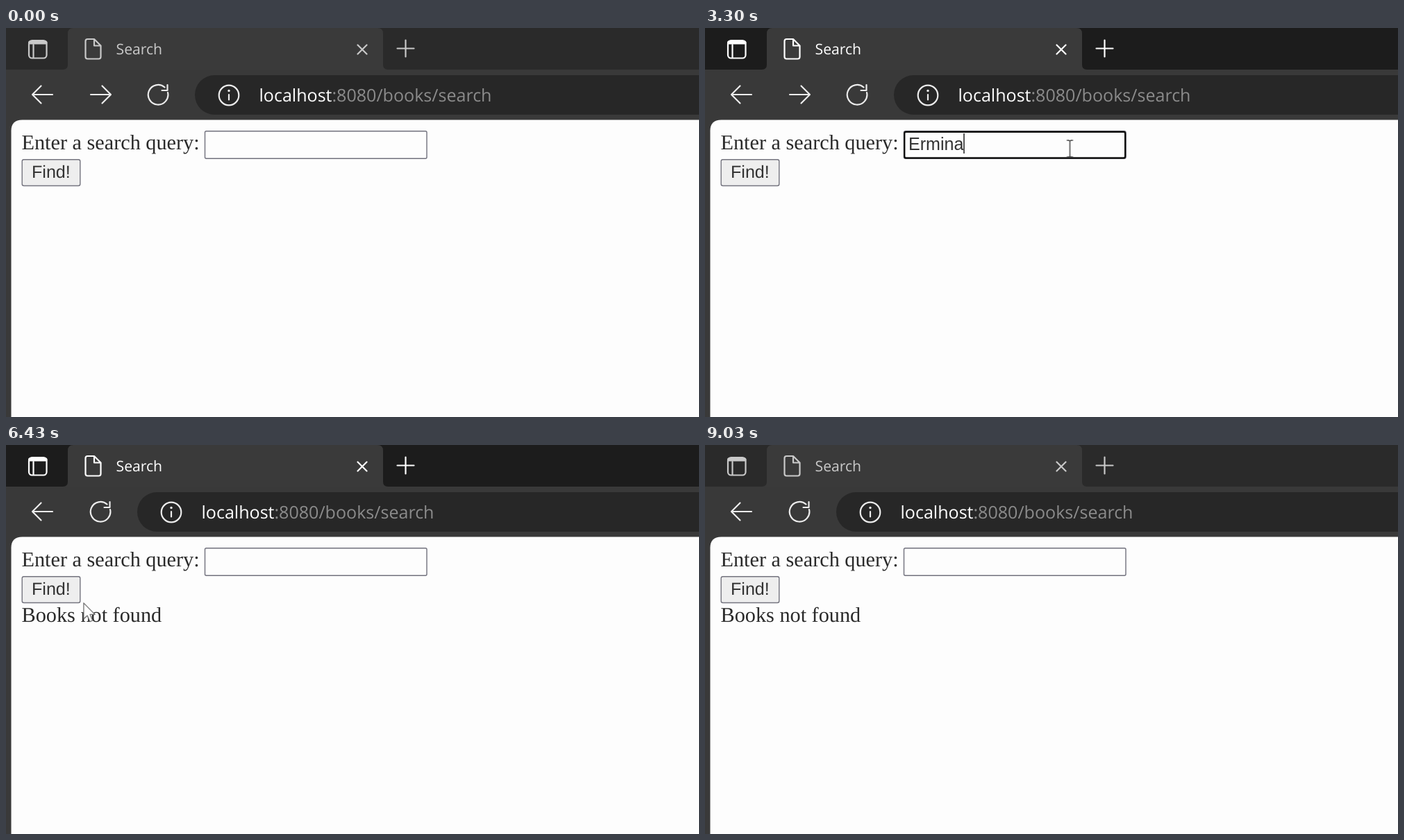
Animation, 998 px wide and 561 px high, one loop 9.13 s. Source, as an HTML page:

```html
<!DOCTYPE html>
<html lang="en">
<head>
<meta charset="utf-8">
<title>Search</title>
<style>
  html, body { margin: 0; width: 100%; height: 100%; overflow: hidden; background: #393939; }
  svg { position: absolute; left: 0; top: 0; text-rendering: geometricPrecision; }
  svg, .typed { --loop: 9130ms step-end infinite; }
  .ui { font-family: "Open Sans", "Noto Sans", sans-serif; }
  .serif { font: 30.25px "Liberation Serif", serif; fill: #2a2a2a; }
  .sans { font: 25.1px "Liberation Sans", sans-serif; fill: #333; }
  .line { fill: none; stroke-width: 2.2; stroke-linecap: round; stroke-linejoin: round; }

  /* Window focus */
  .titlebar { animation: titlebar var(--loop); }
  .tab-ink { animation: tab-ink var(--loop); }
  @keyframes titlebar { 0%, 95.2% { fill: #2a2a2a; } 4% { fill: #1c1c1c; } }
  @keyframes tab-ink { 0%, 95.2% { color: #c9c9c9; } 4% { color: #fff; } }

  /* Page loads */
  .forward { animation: forward var(--loop); }
  .shift { animation: shift var(--loop); }
  .found { animation: found var(--loop); }
  .missing { animation: missing var(--loop); }
  @keyframes forward { 0% { visibility: visible; } 37.2%, 100% { visibility: hidden; } }
  @keyframes shift { 0% { transform: none; } 37.2%, 100% { transform: translateX(-83px); } }
  @keyframes found { 0%, 70.4%, 100% { visibility: hidden; } 37.2% { visibility: visible; } }
  @keyframes missing { 0% { visibility: hidden; } 70.4%, 100% { visibility: visible; } }

  /* Search field */
  .ring { animation: ring var(--loop); }
  .typed {
    position: absolute; left: 293px; top: 152px; height: 30px;
    display: flex; line-height: 30px; color: #333; white-space: pre;
  }
  .typed::before { content: ""; animation: typing var(--loop); }
  .typed::after {
    content: ""; width: 1.5px; height: 29px; background: #555;
    animation: caret var(--loop);
  }
  @keyframes ring {
    0%, 37.2%, 67.5%, 100% { visibility: hidden; }
    16.5%, 54% { visibility: visible; }
  }
  @keyframes caret {
    0%, 22%, 37.2%, 64%, 100% { visibility: hidden; }
    16.5%, 26.3%, 54% { visibility: visible; }
  }
  @keyframes typing {
    0%, 37.2%, 70.4%, 100% { content: ""; }
    26.3% { content: "E"; }
    27.7% { content: "Er"; }
    29% { content: "Erm"; }
    30.4% { content: "Ermi"; }
    32% { content: "Ermin"; }
    33.5% { content: "Ermina"; }
    56% { content: "2"; }
    57.3% { content: "23"; }
    58.5% { content: "231"; }
  }

  /* Pointer */
  .pointer { animation: travel 9130ms linear infinite; }
  .arrow { animation: arrow var(--loop); }
  .beam { animation: beam var(--loop); }
  @keyframes travel {
    0%, 1.5% { transform: translate(1010px, 370px); animation-timing-function: ease-out; }
    10%, 12% { transform: translate(511px, 197px); }
    14.5%, 60.2% { transform: translate(525.5px, 174px); animation-timing-function: ease-in-out; }
    64.29% { transform: translate(91px, 250px); animation-timing-function: ease-out; }
    66.5%, 69% { transform: translate(68px, 212px); animation-timing-function: ease-in; }
    77.5% { transform: translate(1010px, 540px); }
    100% { transform: translate(1010px, 370px); }
  }
  @keyframes arrow { 0%, 61%, 100% { visibility: visible; } 13% { visibility: hidden; } }
  @keyframes beam { 0%, 61%, 100% { visibility: hidden; } 13% { visibility: visible; } }
</style>
</head>
<body>
<svg width="998" height="561" viewBox="0 0 998 561">
  <rect width="998" height="561" fill="#393939"/>
  <rect class="titlebar" width="998" height="60"/>
  <path d="M82 60Q89 60 89 53V8Q89 0 97 0H535Q543 0 543 8V53Q543 60 550 60Z" fill="#3a3a3a"/>

  <!-- Tab strip -->
  <g class="tab-ink" stroke="currentColor">
    <g class="line">
      <rect x="33" y="18" width="25.5" height="25.5" rx="4.5"/>
      <path d="M34.5 21H57" stroke-width="5"/>
      <path d="M39.5 24V43"/>
      <path d="M117.500 16H127L136.500 25.500V41.500Q136.500 44.500 133.500 44.500H117.500Q114.500 44.500 114.500 41.500V19Q114.500 16 117.500 16ZM127 16V25.500H136.500"/>
      <path d="M506.500 24.500L519.500 37.500M519.500 24.500L506.500 37.500"/>
      <path d="M563.500 29.500H587.500M575.500 17.500V41.500"/>
    </g>
    <text class="ui" x="158.500" y="38" font-size="21.200" fill="currentColor" stroke="none">Search</text>
  </g>

  <!-- Toolbar -->
  <g class="line" stroke="#ececec">
    <path d="M67 96H38M50.500 83.500L38 96L50.500 108.500"/>
    <path class="forward" d="M122 96H151M138.500 83.500L151 96L138.500 108.500"/>
  </g>
  <g class="shift">
    <path class="line" stroke="#ececec" d="M233 93A14.300 14.300 0 1 1 228.500 85.500M232.500 82V90H224.500"/>
    <rect x="272" y="68" width="900" height="57" rx="28.500" fill="#272727"/>
    <g class="line" stroke="#ececec">
      <circle cx="321" cy="97" r="14.300"/>
      <path d="M321 96V103.500"/>
    </g>
    <circle cx="321" cy="90.500" r="1.700" fill="#ececec"/>
    <text class="ui" x="364.500" y="106" font-size="25.050" fill="#8b8b8b"><tspan fill="#fff">localhost</tspan>:8080/books/search</text>
  </g>

  <!-- Page -->
  <path d="M7.500 561V148.500Q7.500 132.500 23.500 132.500H998V561Z" fill="#fdfdfd"/>
  <text class="serif" x="22.500" y="175">Enter a search query:</text>
  <rect x="286.500" y="148.700" width="319.500" height="39.600" rx="2" fill="#fdfdfd" stroke="#70707c" stroke-width="1.400"/>
  <rect class="ring" x="287.200" y="149.800" width="318" height="37.700" rx="2.500" fill="#fdfdfd" stroke="#111" stroke-width="2.400"/>
  <rect x="23.200" y="189.700" width="83.600" height="37.800" rx="2.500" fill="#eee" stroke="#74747f" stroke-width="1.400"/>
  <text class="sans" x="37" y="216">Find!</text>
  <g class="found">
    <text class="serif" x="22.500" y="285">Ermina Dovelo, Ferdinand Lodaver, 1833</text>
    <text class="serif" x="22.500" y="350">The book was taken by this user: Telrin Oleg Olegovich</text>
    <path d="M23 374.600H998" stroke="#9c9ca4" stroke-width="1.600"/>
  </g>
  <text class="serif missing" x="22.500" y="255">Books not found</text>
</svg>

<div class="typed sans"></div>

<svg width="998" height="561" viewBox="0 0 998 561">
  <g class="pointer">
    <path class="arrow" d="M.8 .8V23.800L6 19L9.800 27.700L13.600 26L9.900 17.400H17Z" fill="#fff" stroke="#666" stroke-width="1.200" stroke-linejoin="round"/>
    <path class="beam" d="M-4.500 -12H-1.500L0 -11L1.500 -12H4.500M0 -11V11M-4.500 12H-1.500L0 11L1.500 12H4.500" fill="none" stroke="#444" stroke-width="1.500"/>
  </g>
</svg>
</body>
</html>
```
